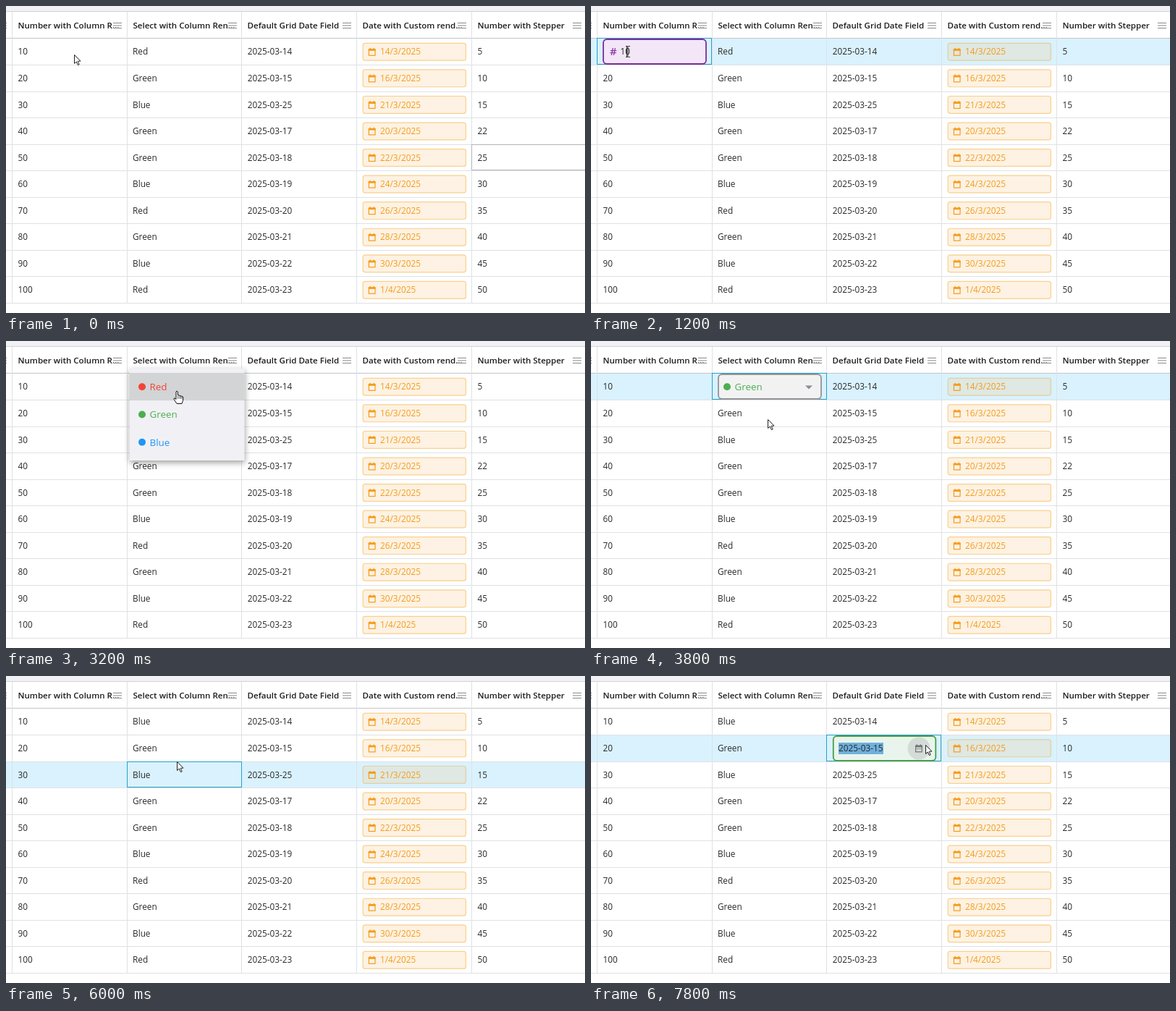
An HTML page with a canvas for the animation above (8 s loop, 800 by 424 pixels).

```html
<!DOCTYPE html>
<html lang="en">
<head>
<meta charset="utf-8">
<title>Grid editors</title>
<style>
  html, body { margin: 0; width: 100%; height: 100%; overflow: hidden; background: #fff; }
  canvas { display: block; }
</style>
</head>
<body>
<canvas id="stage" width="800" height="424"></canvas>
<script>
const ctx = document.getElementById('stage').getContext('2d');
const LOOP = 8000, STEP = 100;
const FONT = '"Open Sans", sans-serif';
const INK = '#2a2a2c', LINE = '#dfe1e5', ORANGE = '#f59c1a', FOCUS = '#2b9fc6';
const HUES = { Red: '#f44336', Green: '#4caf50', Blue: '#2196f3' };

const headers = ['Number with Column R…', 'Select with Column Ren…', 'Default Grid Date Field',
  'Date with Custom rend…', 'Number with Stepper'];
const colors = ['Red', 'Green', 'Blue', 'Green', 'Green', 'Blue', 'Red', 'Green', 'Blue', 'Red'];
const days = [14, 15, 25, 17, 18, 19, 20, 21, 22, 23];
const due = ['14/3', '16/3', '21/3', '20/3', '22/3', '24/3', '26/3', '28/3', '30/3', '1/4'];
const steps = [5, 10, 15, 22, 25, 30, 35, 40, 45, 50];

const colX = c => Math.floor(8.4 + 158.7 * c);
const rowY = r => Math.round(44.4 + 36.55 * r);
const midY = r => 63.2 + 36.55 * r;

// Each entry holds from its time until the next one.
const states = [
  { at: 0, row: -1, cell: [4, 4] },
  { at: 500, row: 0, cell: [0, 0] },
  { at: 800, row: 0, cell: [0, 0], editor: 'number' },
  { at: 1400, row: 0, cell: [0, 0], editor: 'number', selected: true },
  { at: 1900, row: 0, cell: [0, 0] },
  { at: 2300, row: 0, cell: [1, 0] },
  { at: 2800, row: 0, cell: [1, 0], editor: 'select', value: 'Red' },
  { at: 3200, row: -1, menu: 'Red', value: 'Red' },
  { at: 3700, row: 0, cell: [1, 0], editor: 'select', value: 'Green' },
  { at: 4200, row: -1, menu: 'Green', value: 'Green' },
  { at: 5000, row: 0, cell: [1, 0], editor: 'select', value: 'Blue' },
  { at: 5300, row: 2, cell: [1, 2], value: 'Blue' },
  { at: 6400, row: 1, cell: [2, 1], value: 'Blue' },
  { at: 6700, row: 1, cell: [2, 1], value: 'Blue', editor: 'date' },
  { at: 7200, row: 1, cell: [2, 1], value: 'Blue', editor: 'date', selected: true }
];

// Pointer stops: time, x, y, shape worn from that time on.
const stops = [
  [0, 94, 67, 'arrow'], [100, 94, 67, 'arrow'], [500, 52, 59, 'arrow'], [800, 50, 63, 'beam'],
  [1400, 50, 63, 'beam'], [1600, 142, 68, 'arrow'], [1900, 145, 68, 'arrow'],
  [2200, 180, 72, 'arrow'], [2500, 189, 74, 'arrow'], [2900, 234, 67, 'hand'],
  [3200, 236, 69, 'hand'], [3500, 243, 107, 'hand'], [3700, 244, 108, 'arrow'],
  [3900, 244, 108, 'arrow'], [4100, 240, 70, 'hand'], [4200, 240, 70, 'hand'],
  [4600, 238, 118, 'hand'], [5500, 236, 118, 'arrow'], [6000, 236, 118, 'arrow'],
  [6400, 398, 95, 'arrow'], [6700, 402, 100, 'beam'], [7200, 408, 100, 'beam'],
  [7600, 453, 95, 'arrow'], [7800, 462, 95, 'arrow'], [LOOP, 462, 95, 'arrow']
];

function pointerAt(t) {
  const i = stops.findIndex((s, n) => n && t < s[0]) - 1;
  const [t0, x0, y0, shape] = stops[i], [t1, x1, y1] = stops[i + 1];
  const k = (t - t0) / (t1 - t0), e = k * k * (3 - 2 * k);
  return { x: x0 + (x1 - x0) * e, y: y0 + (y1 - y0) * e, shape };
}

function rect(x, y, w, h, fill) {
  ctx.fillStyle = fill;
  ctx.fillRect(x, y, w, h);
}

function text(str, x, y, fill = INK, size = 11.8, weight = 400) {
  ctx.font = `${weight} ${size}px ${FONT}`;
  ctx.fillStyle = fill;
  ctx.fillText(str, x, y + size * 0.36);
}

function box(x, y, w, h, r, fill, stroke, width = 1) {
  ctx.beginPath();
  ctx.roundRect(x, y, w, h, r);
  ctx.fillStyle = fill;
  ctx.fill();
  ctx.strokeStyle = stroke;
  ctx.lineWidth = width;
  ctx.stroke();
}

function dot(x, y, r, fill) {
  ctx.beginPath();
  ctx.arc(x, y, r, 0, 7);
  ctx.fillStyle = fill;
  ctx.fill();
}

function poly(points, fill, stroke) {
  ctx.beginPath();
  points.forEach(([x, y]) => ctx.lineTo(x, y));
  ctx.closePath();
  ctx.fillStyle = fill;
  ctx.fill();
  if (!stroke) return;
  ctx.strokeStyle = stroke;
  ctx.lineWidth = 1;
  ctx.stroke();
}

function calendar(x, y, color) {
  ctx.strokeStyle = color;
  ctx.lineWidth = 1.2;
  ctx.strokeRect(x + 0.6, y + 2, 8.6, 8.4);
  rect(x, y + 1.4, 9.8, 2.6, color);
  rect(x + 1.7, y, 1.3, 2, color);
  rect(x + 6.8, y, 1.3, 2, color);
}

function drawHeader() {
  rect(0, 0, 800, 7, '#f1f1f6');
  rect(0, 7, 800, 1, '#d2d3d8');
  headers.forEach((label, c) => text(label, colX(c) + 8.5, 26.8, '#1d1d1f', 11.55, 600));
  for (let c = -1; c < 5; c++) {
    for (let i = 0; i < 3; i++) rect(colX(c) + 140, 23 + 3.5 * i, 12, 1, '#85878b');
  }
  rect(0, 44, 800, 1, '#c3c5c9');
}

function drawRow(r, s) {
  const active = s.row === r, y = rowY(r), m = midY(r);
  if (active) rect(0, y + 1, 800, rowY(r + 1) - y, '#d9f2fe');
  rect(0, rowY(r + 1), 800, 1, LINE);
  const color = r === 0 && s.value === 'Blue' ? 'Blue' : colors[r];
  text(10 * (r + 1), 16.5, m);
  text(color, 175, m);
  text('2025-03-' + days[r], 333.8, m);
  box(493.2, m - 11.8, 142.2, 23.8, 3, active ? '#dfe8e2' : '#fdf2e3', active ? '#e5cf9d' : '#fad08c', 1.2);
  calendar(500.8, m - 5.3, ORANGE);
  text(due[r] + '/2025', 517, m, ORANGE);
  text(steps[r], 651.5, m);
}

function drawFocus([c, r], stroke) {
  ctx.strokeStyle = stroke;
  ctx.lineWidth = 1;
  ctx.strokeRect(colX(c) + 0.5, rowY(r) + 0.5, 158, rowY(r + 1) - rowY(r) - 1);
}

function drawOption(name, m) {
  dot(188, m, 5, HUES[name]);
  text(name, 198.5, m, HUES[name], 13.4);
}

const editors = {
  number(s) {
    box(17, 46, 142, 34, 5, '#f3e6f6', '#7f2c9c', 1.8);
    text('#', 26, 63, '#8e35ab', 15, 600);
    if (s.selected) rect(40, 55, 14, 16, '#6fb0dc');
    text('10', 40.5, 63.2);
    if (!s.selected) rect(49, 56, 1, 14, INK);
  },
  select(s) {
    box(176, 46, 142, 34, 5, '#f2f2f3', '#939498', 1.8);
    drawOption(s.value, 63.3);
    poly([[296, 61.5], [306, 61.5], [301, 66.5]], '#8b8d91');
  },
  date(s, p) {
    box(334.8, 83, 141.5, 34, 5, '#e9f5ec', '#45a04a', 1.8);
    if (s.selected) rect(342, 92, 62, 16, '#6fb0dc');
    text('2025-03-15', 342, 99.9);
    if (p.x > 436) dot(453, 100, 15.5, '#d3dcd6');
    calendar(448, 94.4, '#6f7473');
    for (let i = 0; i < 3; i++) rect(450 + 2.2 * i, 100, 1.2, 1.2, '#6f7473');
  }
};

function drawMenu(s, p) {
  const names = Object.keys(HUES), first = 44 - 38.2 * names.indexOf(s.menu);
  ctx.save();
  ctx.shadowColor = 'rgba(0,0,0,.38)';
  ctx.shadowBlur = 8;
  ctx.shadowOffsetY = 3;
  rect(170.5, first - 6, 159, 127, '#f1f1f5');
  ctx.restore();
  names.forEach((name, i) => {
    const top = first + 38.2 * i;
    const hover = p.y >= top && p.y < top + 38.2;
    if (name === s.menu) rect(170.5, top, 159, 38.2, '#d2d4d6');
    else if (hover) rect(170.5, top, 159, 38.2, '#e8e8ed');
    drawOption(name, top + 19.3);
  });
}

const pointers = {
  arrow() {
    ctx.translate(0.5, 0.5);
    poly([[0, 0], [0, 12], [2.8, 9.5], [4.9, 14.2], [6.7, 13.4], [4.7, 8.8], [8.5, 8.6]], '#fff', '#222');
  },
  beam() {
    rect(0.5, -8, 1, 16, '#333');
    for (const y of [-8, 7]) {
      rect(-2, y, 2.5, 1, '#333');
      rect(1.5, y, 2.5, 1, '#333');
    }
  },
  hand() {
    ctx.lineJoin = 'round';
    poly([[-1, 1], [0, 0], [1.3, 1], [1.5, 6], [3.7, 6], [4.2, 7], [6, 6.7], [6.8, 7.8], [8.4, 8],
      [8.8, 9.5], [8.4, 13.5], [7, 17.5], [0, 17.5], [-4, 11.5], [-3.4, 9.8], [-1, 11.5]], '#fff', '#111');
    for (const x of [1.5, 4, 6.5]) rect(x, 7, 0.8, 4, '#111');
  }
};

function draw(t) {
  const s = states.findLast(state => state.at <= t), p = pointerAt(t);
  rect(0, 0, 800, 424, '#fff');
  drawHeader();
  for (let r = 0; r < 10; r++) drawRow(r, s);
  for (let c = 0; c < 5; c++) rect(colX(c), 8, 1, 402, LINE);
  if (s.cell) drawFocus(s.cell, s.row < 0 ? '#b2b4b8' : FOCUS);
  if (s.editor) editors[s.editor](s, p);
  if (s.menu) drawMenu(s, p);
  ctx.save();
  ctx.translate(Math.round(p.x), Math.round(p.y));
  pointers[p.shape]();
  ctx.restore();
}

const start = performance.now();
function frame() {
  const t = (performance.now() - start) % LOOP;
  draw(Math.floor(t / STEP) * STEP);
  requestAnimationFrame(frame);
}
frame();
</script>
</body>
</html>
```
